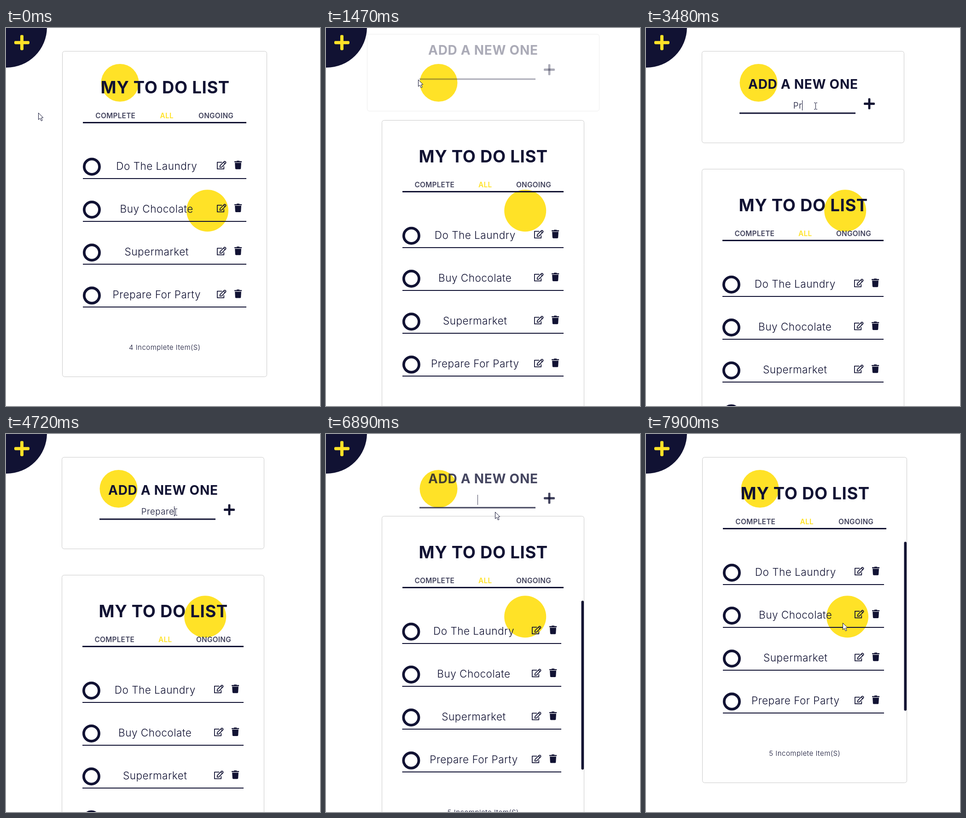
Animation of 682x821 px, one loop 8 s. Source, as an HTML page with a canvas:

```html
<!DOCTYPE html>
<html lang="en">
<head>
<meta charset="utf-8">
<title>To do list</title>
<style>
html, body { margin: 0; width: 100%; height: 100%; overflow: hidden; background: #fff; }
canvas { display: block; width: 682px; height: 821px; }
</style>
</head>
<body>
<canvas id="stage"></canvas>
<script>
const W = 682, H = 821, LOOP = 8000;
const NAVY = '#111233', YELLOW = '#ffe227', BORDER = '#cbcbcb';
const OPEN = 1170, CLOSE = 6650, SLIDE = 742;
const ITEMS = ['Do The Laundry', 'Buy Chocolate', 'Supermarket', 'Prepare For Party'];
const ENTRY = 'Prepare Dinner';
const KEYS = [3310, 3480, 3630, 3710, 3860, 4490, 4720, 5030, 5490, 5570, 5720, 5870, 5950, 6100];
const CARET_OFF = [[2780, 3160], [4410, 4490], [7180, 8000]];

// time, x, y of the pointer tip; positions are held until the next entry
const MOVES = [
  [0, 70, 184], [80, 57, 160], [150, 45, 138],
  [460, 43, 126], [538, 37, 98], [616, 31, 66], [694, 26, 41], [772, 23, 24], [850, 22, 18]
];
const TRAVEL = [[1840, 373, 190], [1920, 367, 171], [2020, 366, 166], [2090, 367, 169]];
const LEAVE = [[2090, 367, 169], [7570, 381, 219], [7650, 408, 331], [7730, 427, 406], [7900, 427, 410]];

const canvas = document.getElementById('stage');
const ctx = canvas.getContext('2d');
const dpr = window.devicePixelRatio || 1;
canvas.width = W * dpr;
canvas.height = H * dpr;

const clamp = v => Math.max(0, Math.min(1, v));
const swing = v => 0.5 - Math.cos(Math.PI * clamp(v)) / 2;
const snap = (t, start, step) => start + Math.floor((t - start) / step) * step;
const hold = (list, t) => list.filter(k => k[0] <= t).pop();

function setFont(weight, size, spacing) {
  ctx.font = `${weight} ${size}px Inter, sans-serif`;
  ctx.letterSpacing = spacing + 'px';
}

function label(str, x, y, weight, size, spacing, color = NAVY) {
  setFont(weight, size, spacing);
  ctx.fillStyle = color;
  ctx.textAlign = 'center';
  ctx.fillText(str, x + spacing / 2, y);
}

function disc(x, y, r, color) {
  ctx.fillStyle = color;
  ctx.beginPath();
  ctx.arc(x, y, r, 0, Math.PI * 2);
  ctx.fill();
}

function bar(x, y, w, h, r = 0, color = NAVY) {
  ctx.fillStyle = color;
  ctx.beginPath();
  ctx.roundRect(x, y, w, h, r);
  ctx.fill();
}

function frame(x, y, w, h) {
  ctx.strokeStyle = BORDER;
  ctx.lineWidth = 1;
  ctx.beginPath();
  ctx.roundRect(Math.round(x) + 0.5, Math.round(y) + 0.5, Math.round(w) - 1, Math.round(h) - 1, 5);
  ctx.stroke();
}

function plus(x, y, size, thick, color) {
  bar(x - size / 2, y - thick / 2, size, thick, thick / 3, color);
  bar(x - thick / 2, y - size / 2, thick, size, thick / 3, color);
}

function trace(points, closed) {
  ctx.beginPath();
  points.forEach(([x, y]) => ctx.lineTo(x, y));
  if (closed) ctx.closePath();
}

// icons are drawn on a grid 512 units high
function icon(x, y, draw) {
  ctx.save();
  ctx.translate(x, y);
  ctx.scale(0.036, 0.036);
  ctx.lineWidth = 48;
  ctx.lineJoin = 'round';
  ctx.strokeStyle = NAVY;
  draw();
  ctx.restore();
}

function pencil() {
  trace([[312, 88], [24, 88], [24, 488], [424, 488], [424, 335]]);
  ctx.stroke();
  trace([[193, 290], [446, 37], [491, 30], [545, 84], [538, 130], [285, 383], [184, 392]], true);
  ctx.stroke();
  trace([[419, 99], [477, 157]]);
  ctx.stroke();
}

function trash() {
  bar(0, 32, 448, 64, 16);
  bar(136, 0, 176, 60, 24);
  ctx.beginPath();
  ctx.moveTo(32, 128);
  ctx.lineTo(416, 128);
  ctx.lineTo(395, 467);
  ctx.quadraticCurveTo(392, 512, 347, 512);
  ctx.lineTo(101, 512);
  ctx.quadraticCurveTo(56, 512, 53, 467);
  ctx.fill();
}

function row(name, left, right, line) {
  ctx.strokeStyle = NAVY;
  ctx.lineWidth = 5.8;
  ctx.beginPath();
  ctx.arc(left + 19.4, line - 25.3, 16.6, 0, Math.PI * 2);
  ctx.stroke();
  label(name, (left + right) / 2 - 17.5, line - 19, 300, 22.5, 0.5);
  icon(right - 64, line - 38, pencil);
  icon(right - 26, line - 38.3, trash);
  bar(left, Math.round(line) - 1, right - left, 2);
}

function listCard(top, narrow, added) {
  const x = narrow ? 121 : 122, w = narrow ? 440 : 445;
  const left = narrow ? 166 : 167, right = narrow ? 516 : 522, span = right - left;
  const mid = narrow ? 341.3 : 345.3;
  const y = Math.round(top);
  frame(x, y, w, 708);
  label('MY TO DO LIST', mid, y + 91.5, 700, 36.5, 0.7);
  const tab = (str, at, color) => label(str, left + span * at, y + 145.7, 600, 15.4, 0.25, color);
  tab('COMPLETE', 0.199, '#41425c');
  tab('ALL', 0.513, YELLOW);
  tab('ONGOING', 0.814, '#41425c');
  bar(left, y + 154, span, 3);
  const shift = added && narrow ? 0.5 : 0;
  ITEMS.forEach((name, i) => row(name, left - shift, right - (added ? 5 : 0), y + 276.5 + i * 93.3));
  if (added) bar(x + w - 6.5, y + 184, 5.5, 367, 2.7);
  label(`${added ? 5 : 4} Incomplete Item(S)`, narrow ? 341 : 344.5, y + 649, 300, 15, 0.5);
}

function addCard(t, away, closing) {
  const dy = -114 * away;
  ctx.globalAlpha = 1 - away;
  if (!closing) {
    const w = 440 + 100 * away, y = 50 - 57 * away;
    frame(341 - w / 2, y, w, 250 - 50 * away - 57 * away - y);
  }
  ctx.save();
  ctx.translate(0, Math.round(dy));
  label('ADD A NEW ONE', 341, 132, 700, 28, 0.7);
  bar(203, 183.5, 252, 3);
  plus(485, 164.5, 24, 4.8, NAVY);

  const typed = closing ? '' : ENTRY.slice(0, KEYS.filter(k => k <= t).length);
  setFont(300, 18.5, 0.6);
  const width = ctx.measureText(typed).width;
  ctx.textAlign = 'left';
  ctx.fillStyle = NAVY;
  ctx.fillText(typed, 329.5 - width / 2, 175);
  const dark = CARET_OFF.some(([a, b]) => t >= a && t < b);
  if (t >= 2240 && !dark) bar(Math.round(329 + width / 2), 157, 1, 22);
  ctx.restore();
  ctx.globalAlpha = 1;
}

function arrow(x, y) {
  ctx.save();
  ctx.translate(x + 0.5, y + 0.5);
  trace([[0, 0], [0, 14.5], [3.4, 11.5], [6, 17.2], [8.5, 16.1], [6, 10.7], [10.3, 10.3]], true);
  ctx.fillStyle = '#fff';
  ctx.fill();
  ctx.strokeStyle = NAVY;
  ctx.lineWidth = 1;
  ctx.lineJoin = 'miter';
  ctx.stroke();
  ctx.restore();
}

function beam(x, y) {
  bar(x, y - 6, 1, 13);
  for (const end of [-7, 7]) {
    bar(x - 3, y + end, 3, 1);
    bar(x + 1, y + end, 3, 1);
  }
}

function pointer(t, away) {
  let x, y;
  if (t < OPEN) [, x, y] = hold(MOVES, t);
  else if (t < 1840) {
    const k = swing((snap(t, OPEN, 75) - OPEN) / 600);
    x = 22 + 356 * k;
    y = 18 + 188 * k;
  } else [, x, y] = hold(t < 2090 ? TRAVEL : LEAVE, t);

  if (t >= 1000 && t < OPEN) disc(22, 20, 14, 'rgba(255,255,0,.47)');
  if (t >= 2240 && t < 2320) disc(367, 168.5, 13.5, 'rgba(255,255,0,.47)');
  const overInput = t >= 2090 && (t < CLOSE || away * 114 < 16);
  if (overInput) beam(368, 169);
  else arrow(Math.round(x), Math.round(y));
}

function draw(t) {
  const closing = t >= CLOSE;
  let away = 1;
  if (closing) away = swing((snap(t, CLOSE, 77) - CLOSE) / SLIDE);
  else if (t >= OPEN) away = 1 - swing((snap(t, OPEN, 75) - OPEN) / SLIDE);
  const narrow = closing ? away < 1 : t >= OPEN;
  let top = 50;
  if (closing) top = 50 + 164 * (1 - away);
  else if (narrow) top = 306 - 164 * away;

  ctx.setTransform(dpr, 0, 0, dpr, 0, 0);
  ctx.fillStyle = '#fff';
  ctx.fillRect(0, 0, W, H);
  disc(narrow ? 244.5 : 247.5, 119, 41, YELLOW);
  disc(narrow ? 432.7 : 437.5, 396.7, 45.5, YELLOW);
  if (narrow) addCard(t, away, closing);
  listCard(top, narrow, closing);
  disc(1, -2, 88, NAVY);
  plus(34.5, 31.7, 33, 7, YELLOW);
  pointer(t, away);
}

const begin = performance.now();
function tick() {
  draw((performance.now() - begin) % LOOP);
  requestAnimationFrame(tick);
}
tick();
</script>
</body>
</html>
```
